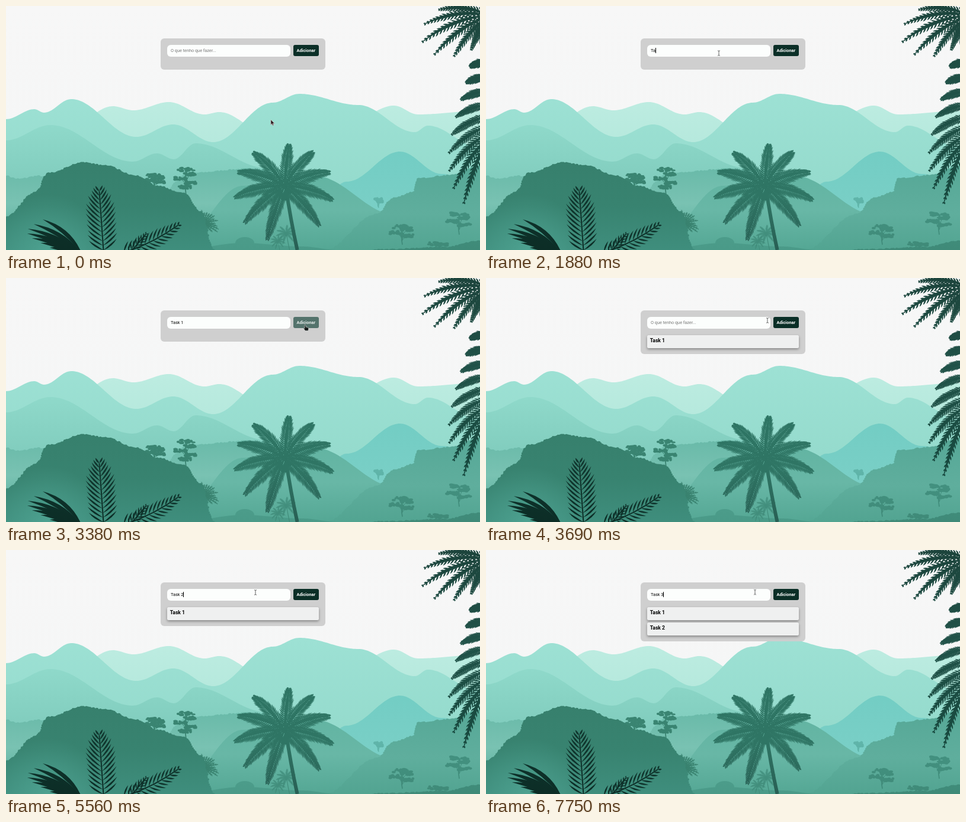
An HTML page with a canvas for the animation above (8000 ms loop, 800 by 414 pixels).

```html
<!DOCTYPE html>
<html lang="pt">
<head>
<meta charset="utf-8">
<title>Lista de tarefas</title>
<style>
html, body { margin: 0; width: 100%; height: 100%; overflow: hidden; background: #f7f7f7; }
body { position: relative; font: 7.3px Roboto, sans-serif; }
canvas { position: absolute; left: 0; top: 0; }
#panel, #panel div, #cursor { position: absolute; box-sizing: border-box; white-space: pre; }
#panel { left: 261px; top: 55px; width: 278px; height: 52.5px; border-radius: 6px; background: rgba(206,206,206,.97); animation: grow 8s step-end infinite; }
#panel .field { left: 11px; top: 11px; width: 207.5px; height: 19.5px; padding-left: 6px; border-radius: 6px; background: #fcfefd; line-height: 19.5px; }
#text.empty { color: #757575; }
#caret { position: absolute; width: .7px; height: 9px; top: 5px; background: #000; }
#panel .button { left: 224px; top: 11px; width: 42.7px; height: 19.3px; border-radius: 3px; background: #0b2f27; color: #fff; font-weight: 700; line-height: 19.5px; text-align: center; animation: hover 8s linear infinite; }
#panel .task { left: 11px; top: 41.5px; width: 256px; height: 22px; padding-left: 4.7px; border-radius: 2.5px; background: #eff0f0; box-shadow: 0 2px 4px rgba(0,0,0,.36); font-size: 8.6px; font-weight: 700; line-height: 19.5px; animation: first 8s step-end infinite; }
#panel .task.second { top: 67.5px; animation-name: second; }
#cursor { left: 0; top: 0; width: 1px; height: 1px; overflow: visible; animation: move 8s ease-in-out infinite; }
.arrow { animation: arrow 8s step-end infinite; }
.beam { animation: beam 8s step-end infinite; }
.hand { animation: hand 8s step-end infinite; }
@keyframes grow { 0% { height: 52.5px } 43.5% { height: 74px } 76.2%, 100% { height: 100px } }
@keyframes first { 0% { opacity: 0 } 43.5%, 100% { opacity: 1 } }
@keyframes second { 0% { opacity: 0 } 76.2%, 100% { opacity: 1 } }
@keyframes hover {
  0%, 41%, 46%, 73.6%, 79.6%, 100% { background: #0b2f27; color: #fff }
  42.2%, 44.9%, 74.8%, 76.5% { background: #54736c; color: #e6ecea }
  78.1% { background: #2b534b; color: #f2f5f4 }
}
@keyframes move {
  0%, .75% { transform: translate(447px, 193px) }
  10.1%, 36% { transform: translate(393px, 80px) }
  42%, 43.5% { transform: translate(505px, 80px) }
  46.1% { transform: translate(475px, 72px) }
  54%, 69.5% { transform: translate(421px, 72px) }
  75%, 76% { transform: translate(505px, 76px) }
  78.1% { transform: translate(487px, 70px) }
  85%, 100% { transform: translate(454px, 71.5px) }
}
@keyframes arrow { 0% { opacity: 1 } 8.8%, 100% { opacity: 0 } }
@keyframes beam { 0% { opacity: 0 } 8.8% { opacity: 1 } 41% { opacity: 0 } 45.2% { opacity: 1 } 73.3% { opacity: 0 } 79.6%, 100% { opacity: 1 } }
@keyframes hand { 0% { opacity: 0 } 41% { opacity: 1 } 45.2% { opacity: 0 } 73.3% { opacity: 1 } 79.6%, 100% { opacity: 0 } }
</style>
</head>
<body>
<canvas id="scene" width="800" height="414"></canvas>
<div id="panel">
  <div class="field"><span id="text"></span><span id="caret"></span></div>
  <div class="button">Adicionar</div>
  <div class="task">Task 1</div>
  <div class="task second">Task 2</div>
</div>
<svg id="cursor">
  <path class="arrow" d="M0 0V8.4L1.9 6.7 3.2 9.7 4.6 9.1 3.3 6.2H6Z" fill="#241a1e" stroke="#e9b9bd" stroke-width=".6"/>
  <path class="beam" d="M-2-4.2Q0-4.2 0-3 0-4.2 2-4.2M0-3.2V3.2M-2 4.2Q0 4.2 0 3 0 4.2 2 4.2" fill="none" stroke="#555" stroke-width=".9"/>
  <path class="hand" d="M-1 0Q0-1 1 0V3L5 4Q6 4.5 5.7 6.2L5 9.5H0L-2.8 5.5Q-2.3 4.2-1 5.3Z" fill="#161b1a" stroke="#e3e6e5" stroke-width=".6"/>
</svg>
<script>
const ctx = document.getElementById('scene').getContext('2d');
const { sin, cos, atan2, hypot, abs, PI } = Math;
const rad = degrees => degrees * PI / 180;
let seed = 7;
const rand = (lo = 0, hi = 1) => {
  seed = (seed * 16807) % 2147483647;
  return lo + (hi - lo) * seed / 2147483647;
};

function shade(y0, y1, ...colors) {
  const g = ctx.createLinearGradient(0, y0, 0, y1);
  colors.forEach((c, i) => g.addColorStop(i / (colors.length - 1), c));
  ctx.fillStyle = ctx.strokeStyle = g;
}

function dot(x, y, rx, ry = rx) {
  ctx.beginPath();
  ctx.ellipse(x, y, rx, ry, 0, 0, 2 * PI);
  ctx.fill();
}

// Cosine ridge through its peaks and valleys; `rough` adds foliage bumps.
function hill(ridge, rough = 0) {
  const p = ridge.split(' ').map(s => s.split(',').map(Number));
  const bumps = [];
  ctx.beginPath();
  ctx.moveTo(p[0][0], 414);
  for (let i = 0; i + 1 < p.length; i++) {
    const [x, y] = p[i], [u, v] = p[i + 1], n = Math.ceil(hypot(u - x, v - y) / 3);
    for (let k = 0; k <= n; k++) {
      const at = [x + (u - x) * k / n, y + (v - y) * (1 - cos(PI * k / n)) / 2];
      ctx.lineTo(...at);
      bumps.push(at);
    }
  }
  ctx.lineTo(p.at(-1)[0], 414);
  ctx.fill();
  if (rough) for (const [x, y] of bumps) dot(x, y + 1, rand(.4, 1) * rough);
}

function stroke(width, x, y, cx, cy, u, v) {
  ctx.lineWidth = width;
  ctx.beginPath();
  ctx.moveTo(x, y);
  ctx.quadraticCurveTo(cx, cy, u, v);
  ctx.stroke();
}

function blade(x, y, u, v, w, bend = 0) {
  const d = hypot(u - x, v - y) || 1, nx = (y - v) / d, ny = (u - x) / d;
  const mx = (x + u) / 2, my = (y + v) / 2;
  ctx.beginPath();
  ctx.moveTo(x, y);
  ctx.quadraticCurveTo(mx + nx * (bend + w), my + ny * (bend + w), u, v);
  ctx.quadraticCurveTo(mx + nx * (bend - w), my + ny * (bend - w), x, y);
  ctx.fill();
}

// Arched stem with paired leaflets, longest near the first third.
function frond(x, y, degrees, size, { lift = .16, leaf, n, w, lean = .9, droop = 0, body = 0, stem = 1.5 }) {
  const a = rad(degrees), u = x + cos(a) * size, v = y + sin(a) * size;
  const cx = (x + u) / 2, cy = (y + v) / 2 - lift * size;
  stroke(stem, x, y, cx, cy, u, v);
  if (body) {
    const side = cos(a) < 0 ? 1 : -1;
    blade(x, y, u, v, body, side * lift * size * abs(cos(a)));
  }
  for (let i = 1; i <= n; i++) {
    const t = i / n, s = 1 - t;
    const px = s * s * x + 2 * s * t * cx + t * t * u, py = s * s * y + 2 * s * t * cy + t * t * v;
    const dir = atan2(s * (cy - y) + t * (v - cy), s * (cx - x) + t * (u - cx));
    const l = leaf * (.2 + .8 * sin(PI * (.2 + .78 * t)) ** .7) * rand(.88, 1.08);
    for (const side of [-1, 1]) {
      const b = dir + side * lean * (1 - .4 * t);
      blade(px, py, px + cos(b) * l, py + (sin(b) + droop) * l, w, side * l * .08);
    }
  }
}

function palm(x, y, scale, height) {
  const look = { leaf: 17 * scale, n: 26, w: 2.5 * scale, droop: .18, body: 6 * scale, stem: 3 * scale };
  for (let k = 0; k < 5; k++) {
    frond(x, y, -84 + 33 * k, (70 + 4 * k) * scale, look);
    frond(x, y, 108 + 30 * k, (92 - 4 * k) * scale, look);
  }
  for (let k = 0; k < 7; k++) dot(x + (k % 4 * 5 - 7) * scale, y + (10 + k % 3 * 5) * scale, 4 * scale);
  stroke(6 * scale, x + 2 * scale, y, x + height * .1, y + height * .55, x + height * .2, y + height);
}

// Flat tiers of foliage on a thin trunk.
function tree(x, y, height, spread, tiers = 4) {
  stroke(1.8, x, y, x - 3, y - height / 2, x, y - height);
  for (let k = 0; k < tiers; k++) {
    const tx = x + (k ? sin(k * 2.4) * spread * .55 : 0), ty = y - height * (1 - k * .17), r = spread * (k ? .5 : .75);
    stroke(1, x, y - height * .25, x, ty + 5, tx, ty);
    for (let i = 0; i < 20; i++) dot(tx + rand(-r, r), ty + rand(-3, 2), rand(2, 4), rand(1.3, 2.6));
  }
}

function backdrop() {
  shade(0, 230, '#f7f7f7', '#f5f6f6');
  ctx.fillRect(0, 0, 800, 414);
  shade(160, 230, '#bdece1', '#b6e9dd');
  hill('120,195 180,170 215,177 275,163 335,184 360,180 440,215 580,196 655,169 695,184 800,178');
  shade(150, 300, '#9de1d4', '#95dbcd');
  hill('0,192 48,175 64,181 110,158 220,222 282,201 350,231 450,164 495,149 595,168 690,214 712,203 800,240');
  shade(202, 310, '#8fd9ca', '#7fcbbc');
  hill('0,228 75,202 214,264 255,250 283,260 320,233 440,275 600,310');
  shade(246, 350, '#73cdc4', '#7acfc6');
  hill('530,330 575,298 665,247 735,285 800,300');
}

function forest() {
  shade(270, 400, '#68b9a8', '#79c2b2', '#5caf9d');
  hill('0,290 20,295 55,290 95,312', 4);
  hill('250,330 310,284 410,277 500,295', 3);
  shade(280, 414, '#62b4a2', '#68b7a6', '#54a794');
  hill('290,400 400,305 520,288 660,355 760,400');
  shade(290, 414, '#58a998', '#5fae9d', '#52a491');
  hill('540,414 626,354 655,326 688,316 697,293 745,288 800,272', 3);
  shade(326, 342, '#60b5aa', '#5cb1a5');
  tree(629, 342, 13, 8, 2);

  shade(340, 414, '#50a18f', '#4a9a88');
  hill('290,414 400,402 500,408 560,414');
  dot(403, 402, 16, 10);
  shade(345, 414, '#439180', '#3f8a78');
  tree(765, 388, 34, 20);
  tree(669, 405, 30, 20);
  tree(727, 414, 10, 20, 2);
  hill('620,414 740,410 800,399', 3);
  palm(473, 386, .2, 28);
  palm(459, 399, .15, 18);
}

function leftHill() {
  shade(275, 385, '#3a8572', '#38816e');
  tree(304, 322, 44, 19, 5);
  tree(251, 310, 22, 18);
  for (let degrees = -140; degrees < 40; degrees += 11) {
    frond(333, 372, degrees, rand(18, 27), { leaf: 5, n: 6, w: 1, body: 1.5 });
  }
  shade(265, 414, '#37806d', '#388370', '#3f8e7d');
  hill('0,358 50,317 72,284 130,266 165,271 222,289 255,306 300,318 328,350 350,414', 3);
  const glow = ctx.createRadialGradient(70, 414, 0, 70, 414, 95);
  glow.addColorStop(0, 'rgba(87,174,157,.6)');
  glow.addColorStop(1, 'rgba(87,174,157,0)');
  ctx.fillStyle = glow;
  ctx.fillRect(0, 319, 170, 95);
}

function foreground() {
  shade(235, 414, '#2d7463', '#2f7564', '#285f54');
  palm(470, 306, 1, 108);

  shade(0, 320, '#1c443c', '#215349', '#17483e');
  const fern = { leaf: 12, n: 17, w: 2.6, lean: .85, body: 6, droop: .1 };
  for (let k = 0; k < 7; k++) frond(812, 14 + k, 186 - 14 * k, 80 + 36 * sin(k * .75), fern);
  for (let k = 0; k <= 1; k += 1 / 8) {
    frond(812, 96 + 130 * sin(k * PI / 2), 168 - 58 * k * k, 28 + 85 * k ** 1.2, fern);
  }

  shade(315, 414, '#10362e', '#0c2d26');
  const sprig = { lift: 0, leaf: 36, n: 14, w: 3, lean: .95, stem: 2 };
  frond(165, 422, -94, 108, sprig);
  frond(192, 420, -26, 109, { ...sprig, lift: -.1, leaf: 23, w: 2.6 });
  frond(205, 424, -50, 48, { ...sprig, leaf: 13, n: 8, w: 2 });
  for (let k = 0; k < 7; k++) blade(128, 420, 62 - 27 * sin(k * .6), 362 + 8 * k, 7, 15 - k * 2);
}

[backdrop, forest, leftHill, foreground].forEach(draw => draw());

const sessions = [
  { focus: 900, first: 1500, gap: 200, sent: 3480 },
  { focus: 4300, first: 4500, gap: 138, sent: 6090 },
  { focus: 6800, first: 7000, gap: 148, sent: 8000 }
];
const label = 'Task ';
const text = document.getElementById('text'), caret = document.getElementById('caret');
let start;

function type(now) {
  start ??= now;
  const t = (now - start) % 8000;
  const index = sessions.findIndex(s => t >= s.focus && t < s.sent);
  let typed = '', visible = false;
  if (index >= 0) {
    const { focus, first, gap } = sessions[index], full = label + (index + 1);
    const count = Math.max(0, Math.min(full.length, Math.floor((t - first) / gap) + 1));
    typed = full.slice(0, count);
    visible = (t - (count ? first + (count - 1) * gap : focus)) % 1000 < 500;
  }
  const shown = typed || 'O que tenho que fazer...';
  if (text.textContent !== shown) text.textContent = shown;
  text.className = typed ? '' : 'empty';
  caret.style.left = `${6 + (typed ? text.getBoundingClientRect().width - .3 : 0)}px`;
  caret.style.opacity = visible ? 1 : 0;
  requestAnimationFrame(type);
}
requestAnimationFrame(type);
</script>
</body>
</html>
```
